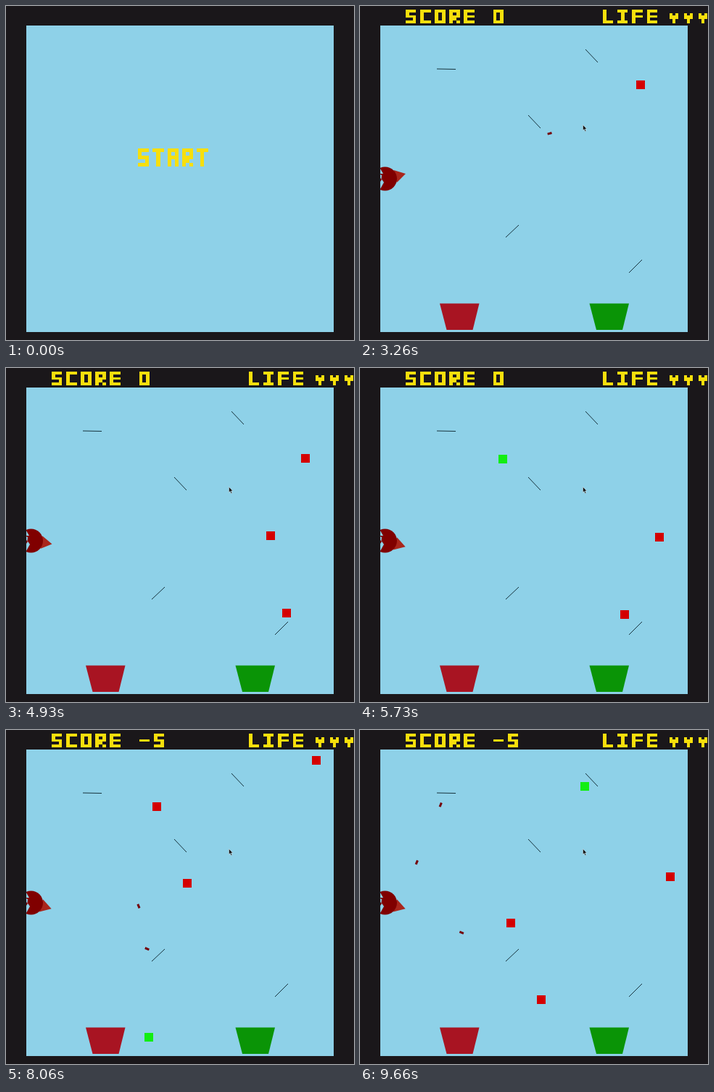
These frames come from a looping animation (480x462 px, 9.72 s). An HTML page with a canvas:

```html
<!DOCTYPE html>
<html lang="en">
<head>
<meta charset="utf-8">
<title>Mirror shooter</title>
<style>
  html, body { margin: 0; width: 100%; height: 100%; overflow: hidden; background: #1a171a; }
  canvas { display: block; }
</style>
</head>
<body>
<canvas id="stage" width="480" height="462" role="img" aria-label="Arcade game: START, SCORE, LIFE"></canvas>
<script>
const ctx = document.getElementById('stage').getContext('2d');
const LOOP = 9720, STEP = 1000 / 15, GAME_START = 28;
const SKY = '#8ed1e8', YELLOW = '#f7df0c', MAROON = '#800000';

// 3 x 5 pixel glyphs, one string per row
const GLYPHS = {
  S: '111 100 111 001 111', T: '111 010 010 010 010', A: '111 101 111 101 101',
  R: '111 101 111 110 101', C: '111 100 100 100 111', O: '111 101 101 101 111',
  E: '111 100 111 100 111', L: '100 100 100 100 111', I: '111 010 010 010 111',
  F: '111 100 111 100 100', 0: '111 101 101 101 111', 5: '111 100 111 001 111',
  '-': '000 000 111 000 000', '♥': '101 111 111 010 010'
};

// x, offset of y against the shared fall distance, colour, y where it ends
const RED = '#d40000', GREEN = '#12ee12', FLOOR = 446;
const BLOCKS = [
  [386.5, 229, RED, FLOOR], [364.5, 122, RED, 402], [413, 15, RED, FLOOR],
  [196.5, -93, GREEN, FLOOR], [175, -199.5, RED, 300], [250, -305.5, RED, FLOOR],
  [208, -412, RED, FLOOR], [428, -476, RED, FLOOR], [309.5, -601, GREEN, FLOOR]
];

const MIRRORS = [
  [106, 87, 132, 87.5], [311, 60, 328, 78], [232, 151, 249, 169],
  [201, 320, 219, 303], [371, 369, 389, 351]
];

const UP_PATH = [[40, 239], [440, 125.8]];
const DOWN_PATH = [[40, 239], [210, 309], [118, 87], [28, 305]];
// path, step at which the bullet leaves the pivot, pixels per step
const SHOTS = [
  [UP_PATH, 0.8, 11.4], [DOWN_PATH, 70.67, 11.4],
  [DOWN_PATH, 78.4, 11.45], [DOWN_PATH, 107.5, 11.4]
];

const clamp = v => Math.max(0, Math.min(1, v));
const mix = (a, b, p) => a + (b - a) * p;

function poly(points, fill) {
  ctx.beginPath();
  points.forEach(([x, y]) => ctx.lineTo(x, y));
  ctx.closePath();
  ctx.fillStyle = fill;
  ctx.fill();
}

function pixelText(text, x, y, w, h, pitch) {
  ctx.fillStyle = YELLOW;
  [...text].forEach((ch, i) => {
    if (!GLYPHS[ch]) return;
    GLYPHS[ch].split(' ').forEach((row, r) => {
      [...row].forEach((bit, c) => {
        if (bit === '0') return;
        const left = Math.round(x + i * pitch + c * w), top = Math.round(y + r * h);
        ctx.fillRect(left, top,
          Math.round(x + i * pitch + (c + 1) * w) - left,
          Math.round(y + (r + 1) * h) - top);
      });
    });
  });
}

function fall(k) {
  if (k < 74) {
    const u = k - 34;
    return 9.181 * u - 0.00234 * u * u;
  }
  const u = k - 74;
  return 363.5 + 8.76 * u - 0.0331 * u * u;
}

function drawBlocks(k) {
  const d = fall(k);
  for (const [x, offset, fill, end] of BLOCKS) {
    const y = offset + d;
    if (y < 36 || y > end) continue;
    ctx.fillStyle = fill;
    ctx.fillRect(Math.round(x - 6), Math.round(y - 6), 12, 12);
  }
}

function drawShot(path, dist) {
  if (dist < 20) return;
  for (let i = 1; i < path.length; i++) {
    const [ax, ay] = path[i - 1], [bx, by] = path[i];
    const len = Math.hypot(bx - ax, by - ay);
    if (dist <= len) {
      ctx.save();
      ctx.translate(mix(ax, bx, dist / len), mix(ay, by, dist / len));
      ctx.rotate(Math.atan2(by - ay, bx - ax));
      ctx.fillStyle = '#740008';
      ctx.fillRect(-3, -1.5, 6, 3);
      ctx.restore();
      return;
    }
    dist -= len;
  }
}

function drawGun(k) {
  const angle = mix(-14, 16.5, clamp((k - 40) / 8)) * Math.PI / 180;
  ctx.save();
  ctx.beginPath();
  ctx.rect(28, 27, 424, 424);
  ctx.clip();
  ctx.save();
  ctx.translate(35, 239);
  ctx.rotate(angle);
  poly([[14, -9], [28.8, 0], [14, 9]], '#a9261c');
  ctx.restore();
  ctx.beginPath();
  ctx.arc(34.5, 239, 16.5, 0, Math.PI * 2);
  ctx.fillStyle = MAROON;
  ctx.fill();
  poly([[28, 225], [32, 232], [28, 232]], SKY);
  poly([[28, 233], [30, 234], [29.5, 239], [33, 244], [28, 253]], SKY);
  poly([[28, 238], [30, 240], [28, 243]], MAROON);
  ctx.restore();
}

function drawMirrors() {
  ctx.strokeStyle = '#16323c';
  ctx.lineWidth = 1;
  ctx.beginPath();
  for (const [x1, y1, x2, y2] of MIRRORS) {
    ctx.moveTo(x1, y1);
    ctx.lineTo(x2, y2);
  }
  ctx.stroke();
}

function drawBucket(x, fill) {
  poly([[x, 411.5], [x + 54.5, 411.5], [x + 45.5, 448], [x + 9.5, 448]], fill);
}

function drawCursor(n) {
  if (n < 10) return;
  const p = clamp((n - 10) / 6), e = 1 - (1 - p) * (1 - p);
  const nudge = clamp((n - 34) / 4);
  ctx.save();
  ctx.translate(mix(472, 306.5, e) + nudge, mix(127, 162.5, e) + nudge * 2);
  const arrow = [[0, 0], [0, 7.5], [1.7, 6], [3, 9], [4.3, 8.4], [3, 5.6], [5.2, 5.4]];
  poly(arrow, '#111');
  ctx.lineWidth = 0.5;
  ctx.strokeStyle = '#dfeef4';
  ctx.stroke();
  ctx.restore();
}

function draw(time) {
  const n = Math.floor((time % LOOP + 7) / STEP), k = n - GAME_START;
  ctx.fillStyle = '#1a171a';
  ctx.fillRect(0, 0, 480, 462);
  ctx.fillStyle = SKY;
  ctx.fillRect(28, 27, 424, 424);

  if (k < 0) {
    pixelText('START', 182, 197, 5.1, 4.9, 20.3);
  } else {
    pixelText(k < 65 ? 'SCORE 0' : 'SCORE -5', 63, 5, 4.8, 3.8, 20.1);
    pixelText('LIFE', 335, 5, 4.7, 3.8, 20.2);
    pixelText('♥♥♥', 427, 10, 4, 2.8, 20);
    drawMirrors();
    drawBucket(110, '#a81422');
    drawBucket(316.5, '#0a9406');
    drawBlocks(k);
    SHOTS.forEach(([path, start, speed]) => drawShot(path, (k - start) * speed));
    drawGun(k);
  }
  drawCursor(n);
}

const origin = performance.now();
function tick() {
  draw(performance.now() - origin);
  requestAnimationFrame(tick);
}
tick();
</script>
</body>
</html>
```
